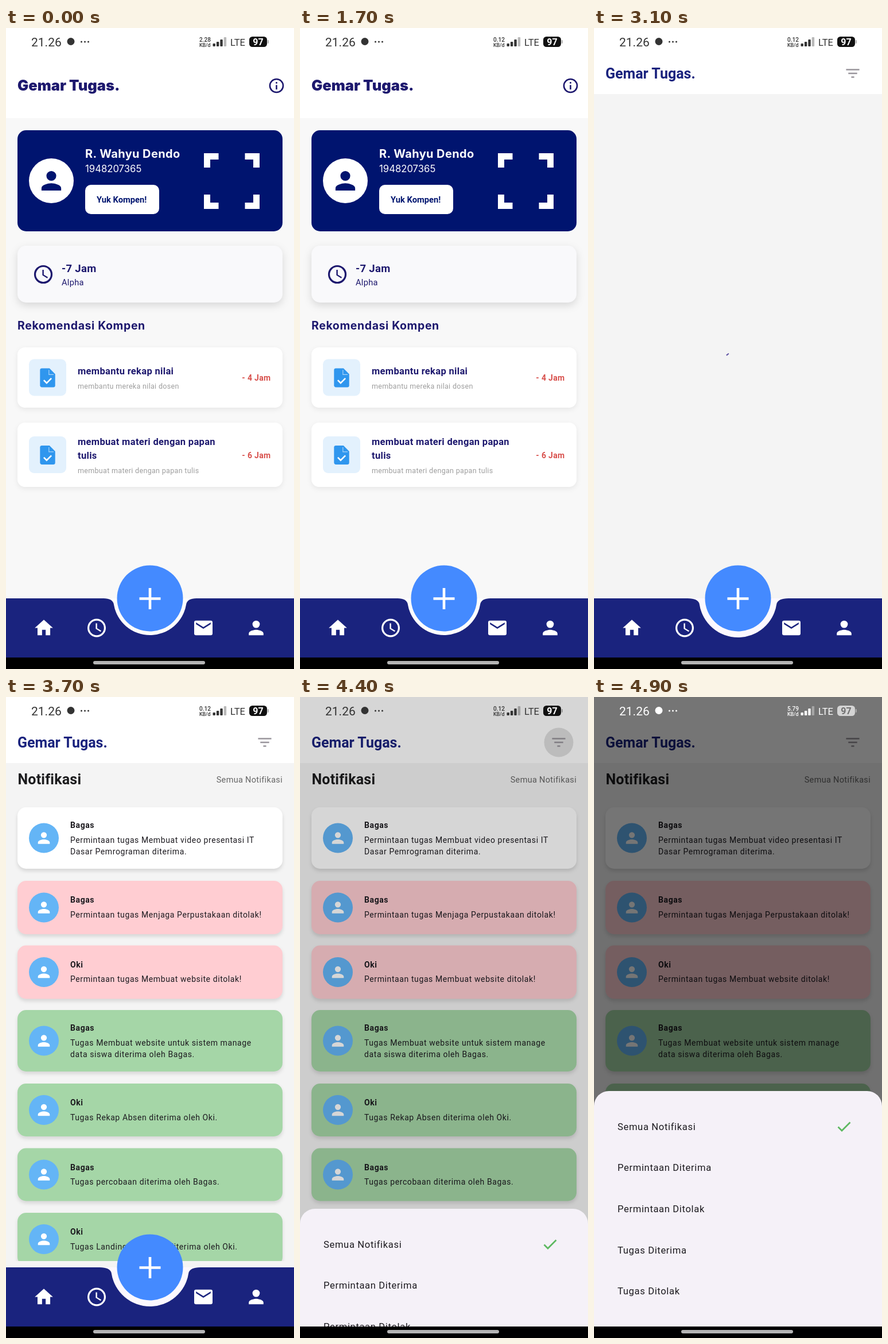
An HTML page for the animation above (5 s loop, 502 by 1116 pixels).

```html
<!DOCTYPE html>
<html lang="id">
<head>
<meta charset="utf-8">
<title>Notifikasi</title>
<style>
  html, body { margin: 0; width: 100%; height: 100%; overflow: hidden; background: #fff; }
  svg { display: block; width: 100vw; height: 100vh; font-family: Roboto, sans-serif; }
  .display { font-family: Inter, sans-serif; }
  .raised { filter: drop-shadow(0 5px 7px rgba(0,0,0,.13)); }
  .soft { filter: drop-shadow(0 3px 4px rgba(0,0,0,.07)); }
  .card { filter: drop-shadow(0 4px 3px rgba(0,0,0,.12)); }
</style>
</head>
<body>
<svg id="stage" viewBox="0 0 502 1116" preserveAspectRatio="none"></svg>
<script>
const NAVY = '#1d186e', INDIGO = '#1a237e', INK = '#1d1b20';
const APP_NAME = 'Gemar Tugas.';

// Icons are drawn on a 24 unit grid.
const ICONS = {
  person: '<path d="M12 12a4 4 0 1 0 0-8 4 4 0 0 0 0 8zm0 2c-2.67 0-8 1.34-8 4v2h16v-2c0-2.66-5.33-4-8-4z"/>',
  home: '<path d="M10 20v-6h4v6h5v-8h3L12 3 2 12h3v8z"/>',
  mail: '<path fill-rule="evenodd" d="M4 4h16a2 2 0 0 1 2 2v12a2 2 0 0 1-2 2H4a2 2 0 0 1-2-2V6a2 2 0 0 1 2-2zM20 6l-8 5-8-5v2l8 5 8-5z"/>',
  clock: '<path fill-rule="evenodd" d="M12 2a10 10 0 1 0 0 20 10 10 0 0 0 0-20zm0 2a8 8 0 1 1 0 16 8 8 0 0 1 0-16z"/><path d="M12.5 7H11v6l5.25 3.15.75-1.23-4.5-2.67z"/>',
  info: '<path fill-rule="evenodd" d="M12 2a10 10 0 1 0 0 20 10 10 0 0 0 0-20zm0 2a8 8 0 1 1 0 16 8 8 0 0 1 0-16z"/><path d="M11 7h2v2h-2zM11 11h2v6h-2z"/>',
  filter: '<path d="M10 18h4v-2h-4zM3 6v2h18V6zM6 13h12v-2H6z"/>',
  task: '<path d="M14 2H6a2 2 0 0 0-2 2v16c0 1.1.9 2 2 2h12a2 2 0 0 0 2-2V8z"/><path d="M13.4 3.6V8.6h5" fill="none" stroke="#fff" stroke-opacity=".6" stroke-width=".7"/><path d="M8 14.5l3 3 5-5" fill="none" stroke="#fff" stroke-width="1.6"/>',
};

const icon = (name, cx, cy, scale, fill) =>
  `<g transform="translate(${cx} ${cy}) scale(${scale}) translate(-12 -12)" fill="${fill}">${ICONS[name]}</g>`;
const rect = (x, y, w, h, r, fill, extra = '') =>
  `<rect x="${x}" y="${y}" width="${w}" height="${h}" rx="${r}" fill="${fill}" ${extra}/>`;
const circle = (cx, cy, r, fill, extra = '') =>
  `<circle cx="${cx}" cy="${cy}" r="${r}" fill="${fill}" ${extra}/>`;
const text = (x, y, size, weight, fill, str, spacing = 0, extra = '') =>
  `<text x="${x}" y="${y}" font-size="${size}" font-weight="${weight}" fill="${fill}" letter-spacing="${spacing}" ${extra}>${str}</text>`;

const DISPLAY = 'class="display"', RIGHT = 'text-anchor="end"';

function navBar(radius, shoulder, gap) {
  const lip = Math.sqrt(radius * radius - 100), left = 251 - lip, right = 251 + lip;
  return rect(160, 993, 182, 103, 0, gap) +
    `<path fill="${INDIGO}" d="M0 993H${shoulder}Q${left - 2} 993 ${left} 1003A${radius} ${radius} 0 0 0 ${right} 1003
      Q${right + 2} 993 ${502 - shoulder} 993H502V1096H0z"/>` +
    circle(251, 993, 57.5, '#448aff') +
    '<path d="M232.5 993.5h37M251 975v37" stroke="#fff" stroke-width="4.6"/>' +
    icon('home', 66, 1044.5, 1.58, '#fff') + icon('clock', 158, 1044.5, 1.6, '#fff') +
    icon('mail', 344, 1044.5, 1.6, '#fff') + icon('person', 436, 1044.5, 1.6, '#fff');
}

function taskCard(y, h, titleLines, subtitle, hours) {
  const mid = y + h / 2, top = titleLines.length > 1 ? y + 38.5 : y + 47;
  const subY = top + 24.5 * titleLines.length;
  return rect(20, y, 462, h, 13, '#fff', 'class="soft"') +
    rect(40, mid - 32, 65, 64, 9, '#e3f1fd') + icon('task', 72.5, mid + .5, 1.65, '#2f96ee') +
    titleLines.map((line, i) => text(125, top + 24.5 * i, 16.5, 700, NAVY, line, .32)).join('') +
    text(125, subY, 12.5, 400, '#9e9e9e', subtitle, .32) +
    text(461.5, mid + 5.5, 14, 700, '#d8504c', hours, .32, RIGHT);
}

function homePage() {
  return rect(0, 0, 502, 1096, 0, '#f8f8f8') + rect(0, 0, 502, 157, 0, '#fff') +
    text(20, 109, 25.5, 900, NAVY, APP_NAME, 0, DISPLAY) + icon('info', 471.5, 100.5, 1.286, NAVY) +
    rect(20, 178, 462, 176, 15, '#00146f') +
    circle(79, 266, 39, '#fff') + icon('person', 79, 266, 2.14, '#00146f') +
    text(138, 226, 20, 700, '#fff', 'R. Wahyu Dendo', .4, DISPLAY) +
    text(138, 251, 16.7, 400, '#fff', '1948207365', 0, DISPLAY) +
    rect(138, 273, 129, 51, 10, '#fff') + text(158, 303.5, 14.7, 700, '#00146f', 'Yuk Kompen!') +
    '<path d="M350.5 243v-19.5h20M416.500 223.500h20v19.500M436.500 290v19.500h-20M370.500 309.500h-20v-19.500" fill="none" stroke="#fff" stroke-width="11"/>' +
    rect(20, 379, 462, 99, 15, '#f9f9fb', 'class="raised"') + icon('clock', 65, 429, 1.61, NAVY) +
    text(97, 425, 18.5, 700, NAVY, '-7 Jam', .32) + text(97, 448, 14.6, 400, NAVY, 'Alpha', .3) +
    text(20, 525, 19.5, 700, NAVY, 'Rekomendasi Kompen', .6, DISPLAY) +
    taskCard(556, 105, ['membantu rekap nilai'], 'membantu mereka nilai dosen', '- 4 Jam') +
    taskCard(687, 112, ['membuat materi dengan papan', 'tulis'], 'membuat materi dengan papan tulis', '- 6 Jam') +
    navBar(64, 170, '#fdfdfd');
}

function noticeCard([y, h, fill, name, ...lines]) {
  const mid = y + h / 2, top = y + (lines.length > 1 ? 36 : 38);
  return rect(20, y, 462, h, 15, fill, 'class="card"') +
    circle(66, mid, 26, '#64b5f6') + icon('person', 66, mid, 1.286, '#fff') +
    text(112, top, 14, 700, INK, name, .6) +
    lines.map((line, i) => text(112, top + 25.700 + 20.500 * i, 14, 400, INK, line, .6)).join('');
}

function noticeList() {
  const pink = '#ffcdd2', green = '#a5d6a7';
  const notices = [
    [192, 107, '#fff', 'Bagas', 'Permintaan tugas Membuat video presentasi IT', 'Dasar Pemrograman diterima.'],
    [320, 93, pink, 'Bagas', 'Permintaan tugas Menjaga Perpustakaan ditolak!'],
    [432.5, 93, pink, 'Oki', 'Permintaan tugas Membuat website ditolak!'],
    [545, 107, green, 'Bagas', 'Tugas Membuat website untuk sistem manage', 'data siswa diterima oleh Bagas.'],
    [673, 92, green, 'Oki', 'Tugas Rekap Absen diterima oleh Oki.'],
    [785.5, 92, green, 'Bagas', 'Tugas percobaan diterima oleh Bagas.'],
    [898, 92, green, 'Oki', 'Tugas Landing page web diterima oleh Oki.'],
  ];
  return text(20.5, 152, 25, 700, '#1c1c1e', 'Notifikasi', .2) +
    text(482, 149, 14.5, 400, '#666', 'Semua Notifikasi', .32, RIGHT) +
    notices.map(noticeCard).join('');
}

function noticePage() {
  return rect(0, 0, 502, 1096, 0, '#f4f4f4') + rect(0, 0, 502, 115, 0, '#fff') +
    text(20, 88, 25, 700, INDIGO, APP_NAME) +
    circle(451, 79, 25.5, '#000', 'id="ripple"') + icon('filter', 451, 79, 1.286, '#99959c') +
    '<path id="spinner" fill="none" stroke="#5f52a4" stroke-width="5.1"/>' +
    `<g id="list" clip-path="url(#listArea)">${noticeList()}</g>` +
    navBar(68, 163, '#fcf8fe');
}

function filterSheet() {
  const options = ['Semua Notifikasi', 'Permintaan Diterima', 'Permintaan Ditolak', 'Tugas Diterima', 'Tugas Ditolak'];
  return rect(0, 0, 502, 440, 26, '#f5f1f8') +
    options.map((label, i) => text(41, 67.5 + 71.7 * i, 16.6, 400, INK, label, .64)).join('') +
    '<path d="M425.500 62.500l6.500 6.500 14.500-14.500" fill="none" stroke="#5cb860" stroke-width="2.700"/>';
}

function statusBar() {
  return text(44, 32, 21, 400, 'currentColor', '21.26') + circle(113, 23.5, 6.5, 'currentColor') +
    [131.5, 137.5, 143.5].map(x => circle(x, 24, 1.5, 'currentColor')).join('') +
    text(337, 24, 10, 500, 'currentColor', '', 0, 'id="speed"') + text(337, 32.5, 8.8, 500, 'currentColor', 'KB/d') +
    [5, 8, 12, 16].map((h, i) =>
      rect(360.5 + 6.4 * i, 32 - h, 4.4, h, 1, 'currentColor', i === 3 ? 'opacity=".35"' : '')).join('') +
    text(391, 31, 16.5, 400, 'currentColor', 'LTE') +
    rect(424, 15, 31, 18, 5.5, 'currentColor', 'id="battery"') + rect(456, 21, 1.6, 6, .8, 'currentColor', 'opacity=".5"') +
    text(439.5, 30, 16, 700, '#fff', '97', 0, 'id="charge" text-anchor="middle"');
}

document.getElementById('stage').innerHTML =
  `<clipPath id="listArea">${rect(0, 115, 502, 867, 0, '#000')}</clipPath>
   <g id="home">${homePage()}</g>
   ${rect(0, 0, 502, 1096, 0, '#000', 'id="pageShade"')}
   <g id="notices">${noticePage()}</g>
   ${rect(0, 0, 502, 1096, 0, '#000', 'id="sheetShade"')}
   <g id="sheet">${filterSheet()}</g>
   <g id="status">${statusBar()}</g>
   ${rect(0, 1096, 502, 20, 0, '#000')}${rect(152, 1102, 195, 6, 3, '#b4b4b4')}`;

const part = {};
document.querySelectorAll('svg [id]').forEach(el => part[el.id] = el);

const clamp = v => Math.min(1, Math.max(0, v));
const progress = (t, start, end) => clamp((t - start) / (end - start));

function bezier(x1, y1, x2, y2) {
  const at = (a, b, s) => 3 * a * s * (1 - s) ** 2 + 3 * b * s * s * (1 - s) + s ** 3;
  return x => {
    let low = 0, high = 1;
    for (let i = 0; i < 30; i++) {
      const mid = (low + high) / 2;
      if (at(x1, x2, mid) < x) low = mid; else high = mid;
    }
    return at(y1, y2, low);
  };
}
const ease = bezier(.25, .1, .25, 1);
const decelerate = bezier(0, 0, .2, 1);
const standard = bezier(.4, 0, .2, 1);
const zoomStart = bezier(.3, 0, .8, .15);
const zoomEnd = bezier(.05, .7, .1, 1);
const zoom = p => p < 1 / 6 ? .4 * zoomStart(p * 6) : .4 + .6 * zoomEnd((p - 1 / 6) * 1.2);

const show = (el, visible) => el.setAttribute('display', visible ? 'inline' : 'none');
const opacity = (el, value) => el.setAttribute('opacity', value);
const scalePage = (el, s) =>
  el.setAttribute('transform', `translate(251 548) scale(${s}) translate(-251 -548)`);

const OPEN_PAGE = 1710, LIST_READY = 3300, OPEN_SHEET = 4350;

function spinnerArc(age) {
  const cycle = age / 1333 % 1;
  const head = standard(clamp(cycle * 2)), tail = standard(clamp(cycle * 2 - 1));
  const start = Math.PI * (-.5 + 1.5 * tail + 2 * age / 2222 + .5 * cycle);
  const sweep = Math.max(.01, 1.5 * Math.PI * (head - tail));
  const point = a => `${251 + 23.15 * Math.cos(a)} ${554 + 23.15 * Math.sin(a)}`;
  return `M${point(start)}A23.15 23.15 0 ${+(sweep > Math.PI)} 1 ${point(start + sweep)}`;
}

function render(t) {
  const turn = progress(t, OPEN_PAGE, OPEN_PAGE + 300);
  show(part.home, turn < 1);
  scalePage(part.home, 1 + .05 * zoom(turn));
  opacity(part.pageShade, .6 * progress(turn, .2075, .4175));
  opacity(part.notices, progress(turn, .125, .25));
  scalePage(part.notices, .85 + .15 * zoom(turn));

  show(part.spinner, t < LIST_READY);
  part.spinner.setAttribute('d', spinnerArc(Math.max(0, t - OPEN_PAGE)));
  show(part.list, t >= LIST_READY);

  part.ripple.setAttribute('r', 25.5 * progress(t, 4230, 4350));
  opacity(part.ripple, .12 * (1 - progress(t, 4420, 4650)));

  const rise = progress(t, OPEN_SHEET, OPEN_SHEET + 250);
  opacity(part.sheetShade, .54 * ease(rise));
  part.sheet.setAttribute('transform', `translate(0 ${1096 - 410 * decelerate(rise)})`);
  show(part.sheet, rise > 0);

  const dark = t >= 4500;
  part.status.setAttribute('color', dark ? '#fff' : '#333');
  part.battery.setAttribute('fill', dark ? '#d4d4d4' : '#111');
  part.charge.setAttribute('fill', dark ? '#707070' : '#fff');
  part.speed.textContent = t < 600 ? '2.28' : t < 4600 ? '0.12' : '5.79';
}

const began = performance.now();
function tick() {
  const elapsed = (performance.now() - began) % 5000;
  render(Math.floor(elapsed / 100) * 100);
  requestAnimationFrame(tick);
}
tick();
</script>
</body>
</html>
```
